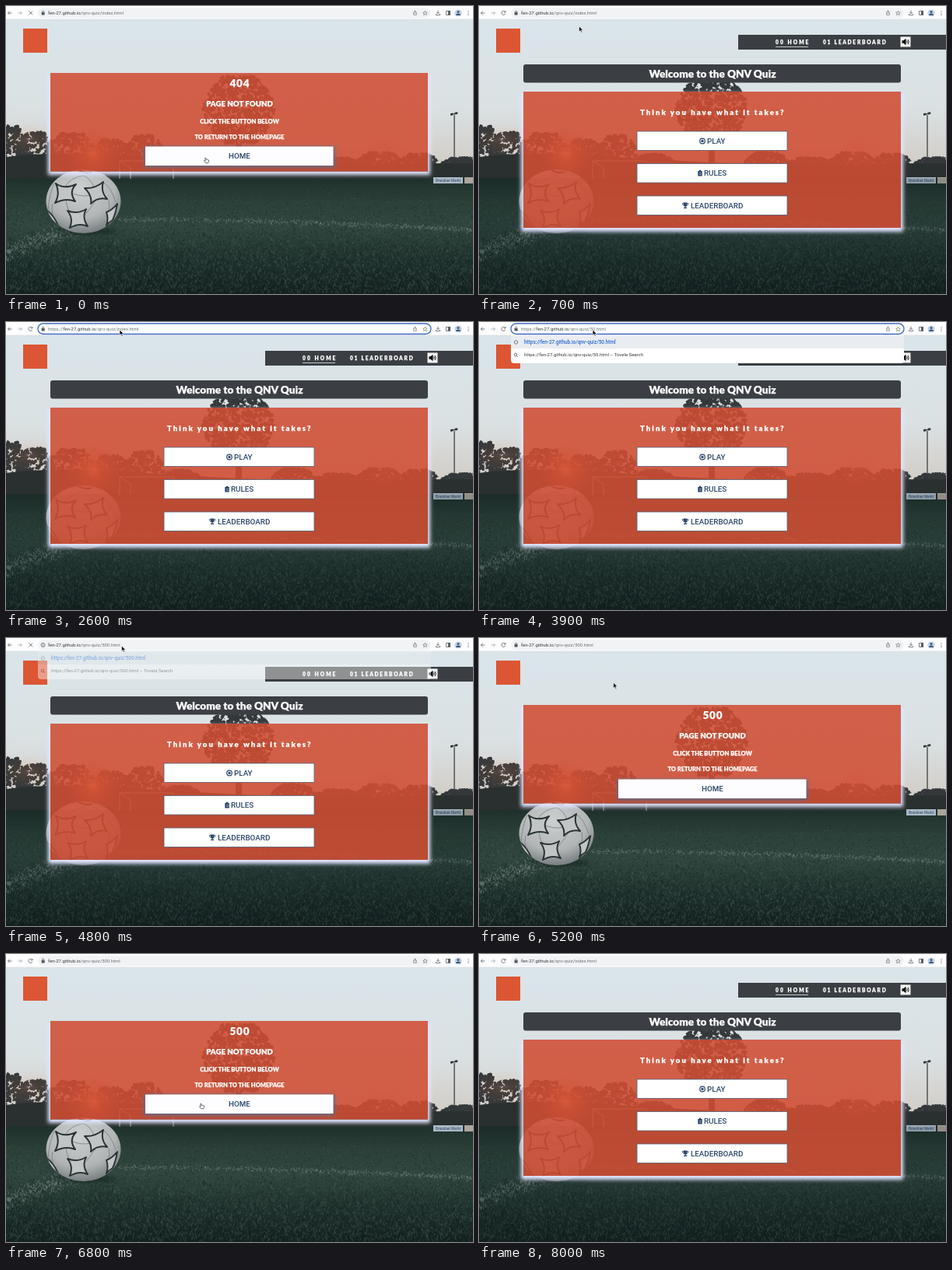
Recreate the animation shown at these times as an HTML page. Size 600 px wide and 370 px high, loop 8100 ms.

```html
<!DOCTYPE html>
<html lang="en">
<head>
<meta charset="utf-8">
<title>Quiz error pages</title>
<style>
html, body { margin: 0; width: 100%; height: 100%; overflow: hidden; background: #fff; }
svg { display: block; width: 600px; height: 370px; }
.lato { font-family: Lato, sans-serif; font-weight: 900; fill: #fff; stroke: #fff; stroke-width: .25; }
.btn { font: 500 9.8px Roboto, sans-serif; fill: #2c466c; }
.bar { font: 6px Roboto, sans-serif; fill: #34373b; }
.mid { text-anchor: middle; }
.line { fill: none; stroke: #5b5f65; stroke-width: .8; }
.glow { fill: #e2e6ff; filter: url(#blur); }
.panel { fill: #d14e34; fill-opacity: .88; }
</style>
</head>
<body>
<svg viewBox="0 0 600 370">
  <defs>
    <linearGradient id="sky" x2="0" y2="1">
      <stop stop-color="#dae5ea"/><stop offset=".55" stop-color="#dae1e3"/><stop offset="1" stop-color="#d0c8c0"/>
    </linearGradient>
    <linearGradient id="grass" x2="0" y2="1">
      <stop stop-color="#1f302b"/><stop offset=".2" stop-color="#2b4038"/><stop offset=".42" stop-color="#30463e"/>
      <stop offset=".7" stop-color="#20332e"/><stop offset="1" stop-color="#14221f"/>
    </linearGradient>
    <radialGradient id="sun">
      <stop stop-color="#ffb18a"/><stop offset=".3" stop-color="#e8793f" stop-opacity=".6"/><stop offset="1" stop-color="#d46a40" stop-opacity="0"/>
    </radialGradient>
    <radialGradient id="ballFill" cx=".45" cy=".3" r=".75">
      <stop stop-color="#cdd0d1"/><stop offset=".6" stop-color="#b0b4b5"/><stop offset="1" stop-color="#646c6d"/>
    </radialGradient>
    <filter id="blur" x="-10%" y="-20%" width="120%" height="140%"><feGaussianBlur stdDeviation="2.6"/></filter>
    <clipPath id="ballClip"><ellipse cx="99.500" cy="251" rx="48" ry="41"/></clipPath>
    <clipPath id="aroundHome"><path clip-rule="evenodd" d="M0 0H600V370H0ZM57 110V285H542V110Z"/></clipPath>
    <clipPath id="aroundError"><path clip-rule="evenodd" d="M0 0H600V370H0ZM57 86V212.500H542V86Z"/></clipPath>
  </defs>

  <!-- Pitch -->
  <rect y="17" width="600" height="205" fill="url(#sky)"/>
  <path id="trees" fill="#34383a"/>
  <path d="M0 194Q60 186 150 192T300 201T450 203T600 202V223H0Z" fill="#2a302f"/>
  <circle cx="112" cy="190" r="34" fill="url(#sun)"/>
  <ellipse cx="30" cy="172" rx="45" ry="22" fill="url(#sun)" opacity=".18"/>
  <circle cx="487" cy="190" r="24" fill="url(#sun)" opacity=".25"/>
  <path d="M576 208V140M571.500 139.500L580.500 137.500" stroke="#30363a" stroke-width="1.200"/>
  <path d="M571 138l3.500-.6v2.800l-3.500.6zM576.500 136.800l3.500-.6v2.800l-3.500.6z" fill="#30363a"/>
  <rect y="221" width="600" height="149" fill="url(#grass)"/>
  <path id="dark" stroke="#0d1a18" stroke-width=".8" opacity=".5"/>
  <path id="light" stroke="#5d736a" stroke-width=".7" opacity=".45"/>
  <path id="chalk" stroke="#a9b5b1" stroke-width=".7" opacity=".5"/>
  <path d="M146 222V199H215V222M146 199L160 208V222" fill="none" stroke="#c5cccb" stroke-width="1" opacity=".8"/>
  <path d="M549 220h38v8h-38z" fill="#a9b9c5"/>
  <path d="M589 220h11v8h-11z" fill="#aca69d"/>
  <text x="552" y="225.700" style="font:700 4.600px Roboto,sans-serif" fill="#53687f">Brandner Markt</text>
  <ellipse cx="103" cy="289" rx="40" ry="4" fill="#101a18" opacity=".5" filter="url(#blur)"/>
  <g clip-path="url(#ballClip)">
    <rect x="50" y="209" width="100" height="86" fill="url(#ballFill)"/>
    <g fill="none" stroke="#7d8586" stroke-width=".9">
      <path d="M75 233Q84 219 100 218Q109 222 113 233M84 240Q96 246 109 243M77 247Q77 258 86 273M117 247Q109 260 99 271M60 254Q58 262 60 268M132 249Q134 257 131 267M124 226Q135 232 141 252M62 227Q56 240 54 262"/>
    </g>
    <g fill="#c1c5c6" stroke="#2b3436" stroke-width="2" stroke-linejoin="round">
      <path d="M64 228Q74 236 90 229Q80 239 89 251Q77 246 63 253Q70 241 64 228ZM101 234Q114 235 125 226Q121 238 130 248Q118 245 109 254Q111 243 101 234ZM79 263Q91 268 103 261Q97 271 105 283Q94 278 82 285Q87 273 79 263ZM129 265Q137 262 143 254Q141 266 137 275Q132 278 129 282Q132 273 129 265ZM52 262Q61 268 67 282Q57 281 52 262ZM93 211Q102 216 110 213"/>
    </g>
  </g>

  <!-- Start page -->
  <g id="home">
    <rect y="221" width="600" height="149" fill="#06121c" opacity=".17"/>
    <g clip-path="url(#aroundHome)"><rect class="glow" x="54" y="112" width="491" height="178"/></g>
    <rect class="panel" x="57" y="110" width="485" height="175"/>
    <rect x="333" y="37" width="267" height="19" fill="#3b3f43"/>
    <g class="lato" font-size="6.600">
      <text x="381" y="48.800" letter-spacing="2.100">00 HOME</text>
      <text x="442" y="48.800" letter-spacing="1.750">01 LEADERBOARD</text>
    </g>
    <path id="underline" d="M381 52.500H423" stroke="#e6e6e6" stroke-width=".8"/>
    <rect x="541.500" y="39.500" width="13" height="13" fill="#f4f4f4"/>
    <path d="M543.500 44.300h2l3-2.500v8.400l-3-2.500h-2z"/>
    <path d="M549.600 44.400q1.300 1.600 0 3.200M551 43q2.600 3 0 6" fill="none" stroke="#000" stroke-width=".9"/>
    <rect x="57" y="75" width="485" height="23.500" rx="3" fill="#3b3f44"/>
    <text class="lato mid" x="300" y="92" font-size="13.600">Welcome to the QNV Quiz</text>
    <text class="lato" x="207" y="139.500" font-size="9.500" letter-spacing="2.080">Think you have what it takes?</text>
    <g fill="#fff" stroke="#53617a" stroke-width=".8">
      <rect x="203" y="161" width="193" height="24.500"/>
      <rect x="203" y="202.500" width="193" height="24.500"/>
      <rect x="203" y="244" width="193" height="24.500"/>
    </g>
    <g class="btn">
      <text x="293" y="176.800">PLAY</text>
      <text x="289" y="218.300">RULES</text>
      <text x="272" y="259.800">LEADERBOARD</text>
      <circle cx="287" cy="173.500" r="3.300" fill="none" stroke="#2c466c" stroke-width="1.200"/>
      <path d="M287 171.600l1.800 1.300-.7 2.100h-2.200l-.7-2.100z"/>
      <path d="M281.300 212h1.500v-1.200h2.400v1.200h1.500v6.600h-5.400z"/>
      <path d="M283 214.500h2.500M283 216.500h2.500" stroke="#fff" stroke-width=".5"/>
      <path d="M262.800 252.500h4.600v2q0 2.500-1.700 3v1.300h1.500v1.200h-4.200v-1.200h1.500v-1.300q-1.700-.5-1.700-3z"/>
      <path d="M263 253.500h-1.700q0 2.600 2.200 3M267.200 253.500h1.700q0 2.600-2.200 3" fill="none" stroke="#2c466c" stroke-width=".8"/>
    </g>
  </g>

  <!-- Error page -->
  <g id="error">
    <g clip-path="url(#aroundError)"><rect class="glow" x="54" y="89" width="491" height="128"/></g>
    <rect class="panel" x="57" y="86" width="485" height="126.500"/>
    <g class="lato mid">
      <text id="code" x="300.400" y="104" font-size="13.500" letter-spacing=".8"></text>
      <text x="300" y="129.200" font-size="9.700">PAGE NOT FOUND</text>
      <text x="300" y="150.600" font-size="7.650">CLICK THE BUTTON BELOW</text>
      <text x="300" y="171" font-size="7.500">TO RETURN TO THE HOMEPAGE</text>
    </g>
    <g id="homeBtn">
      <rect x="178" y="181" width="244" height="26" fill="#55708f" filter="url(#blur)"/>
      <rect x="179" y="180.500" width="241.500" height="24.500" fill="#fdfdff"/>
      <text class="btn mid" x="300" y="195.500">HOME</text>
    </g>
  </g>

  <rect x="22" y="29" width="31" height="31" fill="#dc5633"/>

  <!-- Suggestions -->
  <g id="drop">
    <path d="M41 17H546V49q0 4-4 4H45q-4 0-4-4Z" fill="#fff"/>
    <rect x="41" y="18" width="505" height="16" fill="#e9ecf0"/>
    <circle class="line" cx="47.500" cy="26" r="2.200"/>
    <circle class="line" cx="47" cy="42" r="1.800"/><path class="line" d="M48.300 43.300l1.800 1.800"/>
    <text class="bar" id="hint" x="58" y="28" style="font-size:6.400px;font-weight:500;fill:#2867d2"></text>
    <text class="bar" id="search" x="58" y="44.200"></text>
  </g>

  <!-- Browser bar -->
  <rect width="600" height="17" fill="#fdfdfe"/>
  <path d="M0 17H600" stroke="#d9dde1" stroke-width=".6"/>
  <rect id="field" x="41" y="2" width="505" height="13.500" rx="6.700" stroke-width="1.300"/>
  <g class="line">
    <path d="M7.500 9H2.500m2.300-2.300L2.500 9l2.300 2.300"/>
    <path d="M15.500 9h5m-2.300-2.300L20.500 9l-2.300 2.300" stroke="#a5a8ad"/>
    <path id="reload" d="M33.600 7.600a2.500 2.500 0 1 0 .2 2.200M34 6v2h-2"/>
    <path id="stop" d="M29.500 6.800l4.500 4.500M34 6.800l-4.500 4.500"/>
    <g id="lock"><rect x="46" y="8.300" width="3.200" height="2.800" fill="#50545a"/><path d="M46.500 8V6.800q1.100-1.600 2.200 0V8"/></g>
    <g id="info"><circle cx="47.500" cy="9" r="2.500"/><path d="M47.500 8.600v2M47.500 7.200v.7"/></g>
    <g stroke-width=".6">
      <path d="M524.600 8h-1v3.400h3.800V8h-1M525.500 9.800V6m-1.200 1.100l1.200-1.200 1.200 1.200"/>
      <path d="M538.500 6.300l.8 1.800 2 .2-1.500 1.300.5 2-1.800-1-1.800 1 .5-2-1.500-1.300 2-.2z"/>
    </g>
    <path d="M555 5.800v3.900m-1.700-1.600l1.700 1.700 1.700-1.700M552.500 10v1.700h5V10"/>
    <path d="M565.500 6.500h5v4.900h-5z"/><path d="M568.300 6.500h2.200v4.900h-2.200z" fill="#50545a"/>
  </g>
  <circle cx="581" cy="9" r="4.600" fill="#c3d3e6"/>
  <circle cx="581" cy="7.500" r="1.500" fill="#40597a"/><path d="M578 12q0-2.600 3-2.600t3 2.600z" fill="#40597a"/>
  <g fill="#50545a"><circle cx="594" cy="6.800" r=".6"/><circle cx="594" cy="9" r=".6"/><circle cx="594" cy="11.200" r=".6"/></g>
  <rect id="mark" y="4.500" height="8.500" fill="#b3d0fb"/>
  <text class="bar" x="54" y="11.100"><tspan id="scheme" fill="#6b7075"></tspan><tspan id="host"></tspan><tspan id="path" fill="#6b7075"></tspan></text>

  <g id="pointer">
    <path id="arrow" d="M0 0V7.200l1.700-1.600 1.200 2.700 1.200-.6-1.200-2.500h2.300z" fill="#111" stroke="#fff" stroke-width=".6"/>
    <path id="hand" transform="scale(.8)" d="M-1.600-3.400q.9-.8 1.300.2l.5 2.200q2-.5 4.100 1v2.600l-1 2H-.5L-3 1.400q0-1.200 1.300-.6l.7.5z" fill="#fff" stroke="#222" stroke-width=".8"/>
  </g>
</svg>
<script>
const LOOP = 8100;
const HOST = 'fen-27.github.io', DIR = '/qnv-quiz/';
const $ = id => document.getElementById(id);
const show = (id, on) => $(id).style.display = on ? '' : 'none';
const within = (t, a, b) => t >= a && t < b;

let seed = 11;
const rnd = () => (seed = seed * 16807 % 2147483647) / 2147483647;

function growTrees() {
  // centre x, top, half width
  const stands = [[6, 152, 22], [38, 160, 24], [85, 161, 30], [135, 169, 24], [178, 164, 26],
    [225, 188, 25], [370, 186, 28], [425, 193, 30], [480, 186, 30], [530, 188, 26], [585, 193, 26]];
  let d = '';
  const crown = (x, top, bottom, w) => {
    for (let i = 0; i < 380; i++) {
      const k = rnd(), r = .6 + 2.2 * rnd();
      const cx = x + (rnd() * 2 - 1) * w * (.2 + .8 * Math.sin(Math.PI * (.1 + .8 * k)));
      const cy = top + r + k * (bottom - top);
      d += `M${cx - r} ${cy}a${r} ${r} 0 1 0 ${2 * r} 0a${r} ${r} 0 1 0 ${-2 * r} 0`;
    }
  };
  for (const [x, top, w] of stands) crown(x, top, 212, w);
  for (let i = 0; i < 3; i++) crown(299, 88, 174, 46);
  $('trees').setAttribute('d', d + 'M295 165h8v45h-8z');
}

// Each blade leans at random and grows with its nearness, 0 to 1.
function growBlades(id, count, place) {
  let d = '';
  for (let i = 0; i < count; i++) {
    const [x, y] = place(), near = (y - 222) / 148;
    d += `M${x} ${y}l${(rnd() - .5) * (1 + 5 * near)} ${-.6 - 5 * near * rnd()}`;
  }
  $(id).setAttribute('d', d);
}

const anywhere = () => [rnd() * 600, 224 + Math.sqrt(rnd()) * 146];
function onLine() {
  const u = rnd(), jitter = rnd() + rnd() - 1;
  return rnd() < .6 ? [145 + 455 * u, 275 + 14 * u * u + 4 * jitter]
    : [95 * u, 318 - 34 * u + 14 * jitter];
}

// time, x, y
const track = [[0, 257, 198], [200, 257, 198], [600, 128.500, 26], [1000, 128.500, 26], [1400, 146, 10],
  [4500, 146, 10], [4700, 148.500, 10], [5000, 148.500, 10], [5600, 241, 191], [6100, 241, 191], [6600, 251, 195],
  [7300, 251, 195], [7800, 150, -14], [LOOP, 150, -14]];

function pointerAt(t) {
  const i = track.findIndex(k => k[0] > t);
  const [t0, x0, y0] = track[i - 1], [t1, x1, y1] = track[i];
  const p = (t - t0) / (t1 - t0), e = p * p * (3 - 2 * p);
  return [x0 + (x1 - x0) * e, y0 + (y1 - y0) * e];
}

function draw(t) {
  const error = t < 200 || within(t, 5200, 7300);
  const loading = t < 200 || within(t, 4600, 5200) || within(t, 7000, 7300);
  const editing = within(t, 1500, 4600);
  const typed = Math.min(3, Math.max(0, Math.floor((t - 3100) / 300)));
  const name = within(t, 3400, 7000) ? '500'.slice(0, typed) : 'index';
  const file = name + '.html';

  show('home', !error);
  show('error', error);
  $('code').textContent = t < 200 ? '404' : '500';
  show('underline', !within(t, 3400, 5200));
  show('reload', !loading);
  show('stop', loading);
  show('info', within(t, 4600, 5200));
  show('lock', !within(t, 4600, 5200));

  $('field').setAttribute('fill', editing ? '#fff' : '#f1f3f5');
  $('field').setAttribute('stroke', editing ? '#4169c4' : 'none');
  $('scheme').textContent = within(t, 2100, 4600) ? 'https://' : '';
  $('host').textContent = HOST;
  $('path').textContent = DIR + file;
  const all = within(t, 1500, 2100);
  show('mark', all || within(t, 2900, 3400));
  $('mark').setAttribute('x', all ? 53.500 : 143.200);
  $('mark').setAttribute('width', all ? 97.500 : 14.300);

  show('drop', within(t, 3400, 5000));
  $('drop').style.opacity = t < 4600 ? 1 : Math.max(0, 1 - (t - 4600) / 350);
  $('hint').textContent = 'https://' + HOST + DIR + file;
  $('search').textContent = 'https://' + HOST + DIR + file + ' – Tovela Search';

  const [x, y] = pointerAt(t);
  const over = error && within(x, 179, 421) && within(y, 180, 206);
  $('pointer').setAttribute('transform', `translate(${x} ${y})`);
  show('hand', over);
  show('arrow', !over);
  const lift = t < 200 || t > 6300 ? 0 : 1;
  $('homeBtn').setAttribute('transform', `translate(0 ${lift})`);
}

growTrees();
growBlades('dark', 4500, anywhere);
growBlades('light', 4500, anywhere);
growBlades('chalk', 900, onLine);
const start = performance.now();
function tick() {
  draw((performance.now() - start) % LOOP);
  requestAnimationFrame(tick);
}
tick();
</script>
</body>
</html>
```
